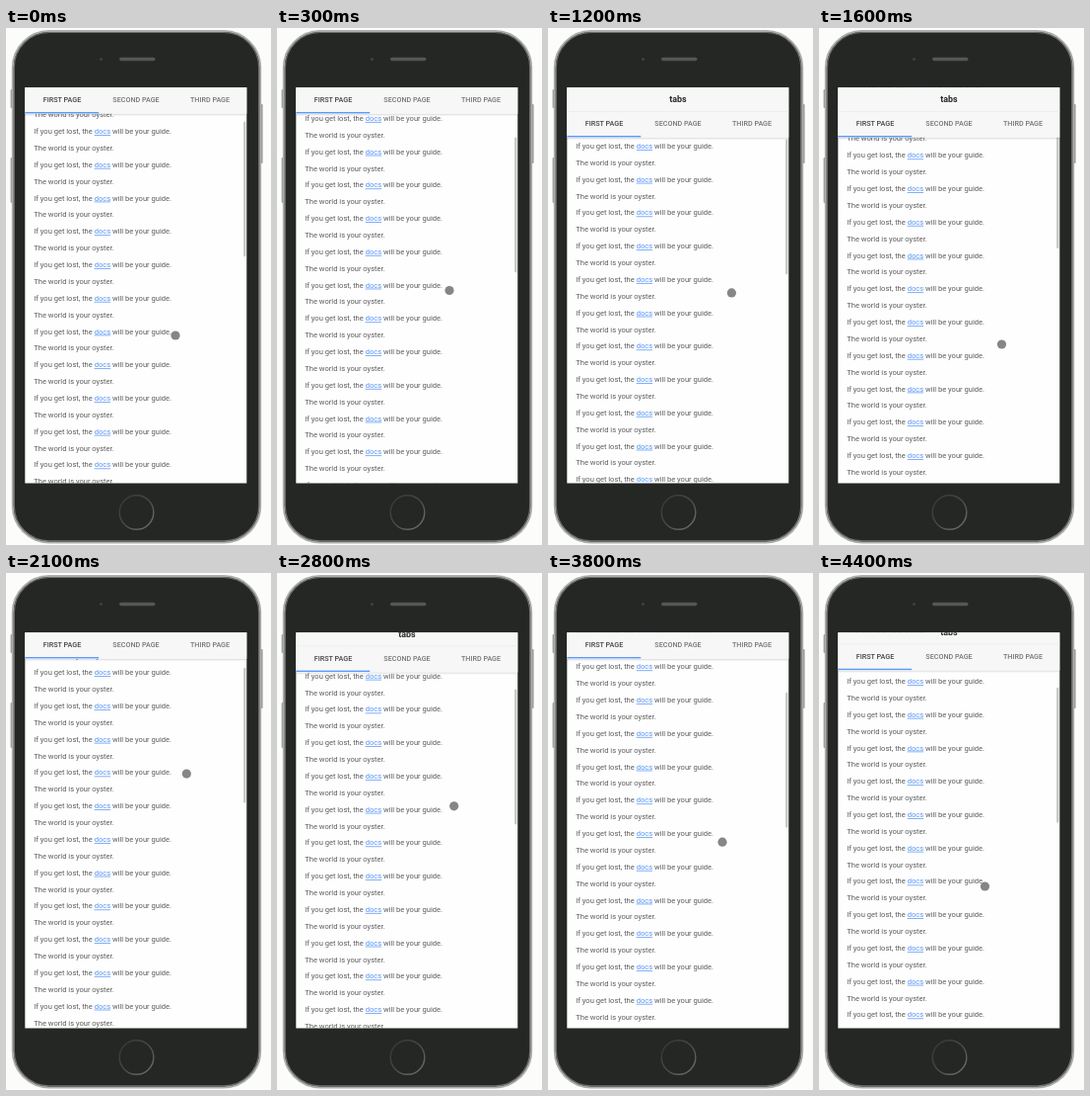
Animation, 269 px wide and 523 px high, one loop 4500 ms. Source, as an HTML page:

```html
<!DOCTYPE html>
<html lang="en">
<head>
<meta charset="utf-8">
<title>Scrolling tabs</title>
<style>
  html, body { margin: 0; width: 100%; height: 100%; overflow: hidden; background: #fcfdfb; }
  svg { display: block; width: 269px; height: 523px; font-family: Roboto, Arial, sans-serif; }
  .row { font-size: 7.55px; fill: #5c5c5c; }
  .link { fill: #5a95fb; text-decoration: underline; }
  .tab { font-size: 7.2px; font-weight: 500; fill: #767676; text-anchor: middle; }
  .tab.on { fill: #444; }
  .title { font-size: 8.9px; font-weight: 600; fill: #2a2a2a; text-anchor: middle; }
</style>
</head>
<body>
<svg viewBox="0 0 269 523">
  <defs>
    <clipPath id="screen"><rect x="19.3" y="60.3" width="225" height="400.3"/></clipPath>
    <linearGradient id="ring" x1="0" y1="0" x2="1" y2="1">
      <stop offset="0" stop-color="#333532"/>
      <stop offset=".5" stop-color="#484a47"/>
      <stop offset="1" stop-color="#737572"/>
    </linearGradient>
    <linearGradient id="shade" x1="0" y1="0" x2="0" y2="1">
      <stop offset="0" stop-color="#000" stop-opacity=".14"/>
      <stop offset="1" stop-color="#000" stop-opacity="0"/>
    </linearGradient>
  </defs>

  <g fill="#9a9c99">
    <rect x="4.6" y="62" width="3" height="19" rx="1"/>
    <rect x="4.6" y="131" width="3" height="46" rx="1"/>
    <rect x="257.6" y="77" width="3" height="60" rx="1"/>
  </g>
  <rect x="6.8" y="3" width="251.4" height="517.4" rx="37" fill="#252724" stroke="#acaeab" stroke-width="2"/>
  <rect x="8.3" y="4.5" width="248.4" height="514.4" rx="35.5" fill="none" stroke="#6f716e" stroke-width="1.2"/>
  <circle cx="96.5" cy="31.5" r="1.6" fill="#3d4145"/>
  <rect x="115" y="29.7" width="36.5" height="3.6" rx="1.8" fill="#555754"/>
  <circle cx="132.5" cy="490" r="17.3" fill="none" stroke="url(#ring)" stroke-width="1.4"/>

  <g clip-path="url(#screen)">
    <rect x="19" y="60" width="226" height="401" fill="#fdfefd"/>
    <g id="list"></g>
    <rect id="thumb" x="241.2" width="2.2" height="137" rx="1.1" fill="#c4c4c4"/>
    <g id="header">
      <rect x="19" y="86.8" width="226" height="2.5" fill="url(#shade)"/>
      <rect x="19" y="30" width="226" height="56.8" fill="#f7f7f7"/>
      <text class="title" x="132" y="51">tabs</text>
      <rect x="19" y="60" width="226" height=".5" fill="#e4e4e4"/>
      <text class="tab on" x="57" y="75.2">FIRST PAGE</text>
      <text class="tab" x="132" y="75.2">SECOND PAGE</text>
      <text class="tab" x="207" y="75.2">THIRD PAGE</text>
      <rect x="19" y="85" width="75.2" height="1.4" fill="#5c98fc"/>
    </g>
    <circle id="dot" r="4.6" fill="#868686"/>
  </g>
</svg>
<script>
  const LOOP = 4500, STEP = 100;
  const PITCH = 16.87, FIRST_ROW = 33.1, ROWS = 46, REPEAT_ROW = 37;
  const MAX_DROP = 24, DROP_RATE = 0.68, THUMB_RATE = 0.342;

  // Turning points: [time, value]
  const scrollTurns = [[0, 94.7], [700, 215.4], [1790, 59], [2600, 182.6], [3150, 114], [3900, 174.5], [LOOP, 156]];
  const pointerX = [[0, 172], [1000, 186.5], [3800, 177], [LOOP, 168]];
  const pointerY = [[0, 311], [700, 194], [1600, 320], [2300, 176], [3200, 278], [3600, 266], [LOOP, 318.6]];

  const el = id => document.getElementById(id);
  const list = el("list"), header = el("header"), thumb = el("thumb"), dot = el("dot");

  // The alternation of the two lines flips once at REPEAT_ROW.
  const rowText = i => (i % 2 === 0) === (i < REPEAT_ROW)
    ? 'If you get lost, the <tspan class="link">docs</tspan> will be your guide.'
    : "The world is your oyster.";

  list.innerHTML = Array.from({ length: ROWS }, (_, i) =>
    `<text class="row" x="28.3" y="${FIRST_ROW + i * PITCH}">${rowText(i)}</text>`
  ).join("");

  // Swings smoothly from one turning point to the next.
  function swing(turns, t) {
    const next = turns.findIndex(turn => turn[0] > t);
    const [t0, v0] = turns[next - 1], [t1, v1] = turns[next];
    return v0 + (v1 - v0) * (1 - Math.cos(Math.PI * (t - t0) / (t1 - t0))) / 2;
  }

  // The header slides in while scrolling back and out while scrolling on.
  function dropAt(t) {
    let drop = 0;
    for (let u = STEP; u <= t; u += STEP) {
      const delta = swing(scrollTurns, u) - swing(scrollTurns, u - STEP);
      drop = Math.min(MAX_DROP, Math.max(0, drop - delta * DROP_RATE));
    }
    return drop;
  }

  const move = (node, x, y) => node.setAttribute("transform", `translate(${x} ${y})`);
  const start = performance.now();

  function draw(now) {
    const elapsed = Math.max(0, now - start) % LOOP;
    const t = Math.floor(elapsed / STEP) * STEP;
    const scroll = swing(scrollTurns, t);
    move(list, 0, -scroll);
    move(header, 0, dropAt(t));
    move(thumb, 0, 62 + scroll * THUMB_RATE);
    move(dot, swing(pointerX, t), swing(pointerY, t));
    requestAnimationFrame(draw);
  }
  draw(start);
</script>
</body>
</html>
```
